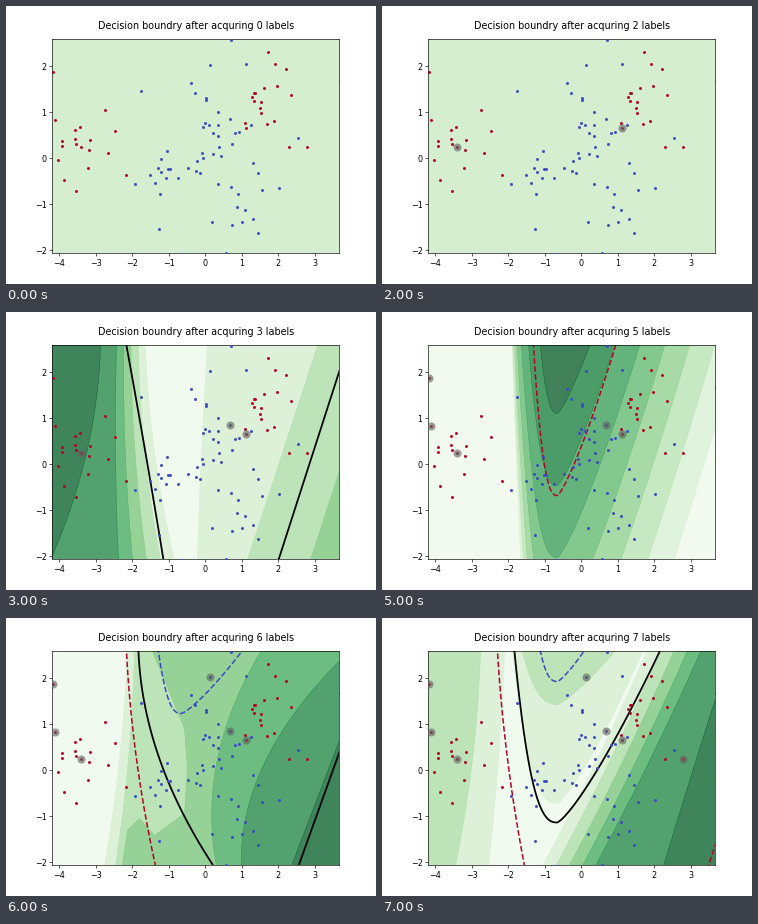
Recreate the animation shown at these times as a matplotlib script. Size 370 by 278 pixels, loop 8 s.

```python
import matplotlib.pyplot as plt
import numpy as np
from matplotlib.animation import FuncAnimation
from matplotlib.patches import Polygon

# Positions are in stage pixels, y pointing down.
W, H, DPI = 370, 278, 57.8125
LEFT, RIGHT, TOP, BOTTOM = 0.125 * W, 0.9 * W, 0.12 * H, 0.89 * H
ORIGIN, UNIT_X, UNIT_Y = (198.9, 152), 36.5, 46
ALPHA, TIP_X = 0.75, 175
BLUE, RED = plt.cm.coolwarm(0.0), plt.cm.coolwarm(1.0)

# Points in the order they receive a label.
QUERIES = [(74, 140.5), (239.3, 121.3), (223, 112.5), (46.5, 66),
           (48.3, 114), (203.3, 59), (300.5, 141)]


def cluster(rng, count, center, spread):
    return [tuple(p) for p in rng.normal(center, spread, (count, 2))]


def make_dots():
    """Key dots that shape each class, filled up with seeded clusters."""
    rng = np.random.default_rng(4)
    q = QUERIES
    red = [q[0], q[1], q[3], q[4], q[6], (119, 169), (69, 184.5),
           (108.5, 125), (333, 75), (261, 46), (279.5, 63), (282, 141)]
    red += cluster(rng, 13, (78, 135), (14, 17))
    red += cluster(rng, 14, (258, 98), (13, 19))
    blue = [q[2], q[5], (224, 33.5), (239, 58), (134.5, 85), (291, 132),
            (152.5, 222.5), (174, 247.5), (219, 247), (251.5, 227)]
    blue += cluster(rng, 22, (212, 122), (16, 24))
    blue += cluster(rng, 14, (153, 163), (17, 11))
    blue += cluster(rng, 13, (232, 185), (24, 25))
    return (red, RED), (blue, BLUE)


def sweep(top, mid, bottom):
    """Parabola through the x positions at the top, middle and bottom."""
    t = np.linspace(-0.03, 1.03, 40)
    x = (top * (1 - t) * (1 - 2 * t) + 4 * mid * t * (1 - t)
         + bottom * t * (2 * t - 1))
    return np.column_stack([x, TOP + (BOTTOM - TOP) * t])


def valley(left, tip, right):
    """Open-topped V: a steep left arm and a nearly straight right arm."""
    u = np.linspace(1.03, 0, 30)
    depth = tip - TOP
    arm_l = np.column_stack([TIP_X + (left - TIP_X) * u, tip - depth * u**2.6])
    arm_r = np.column_stack([TIP_X + (right - TIP_X) * u, tip - depth * u**1.25])
    return np.vstack([arm_l, arm_r[-2::-1]])


def fan(side, bands, first, last):
    """One region per band, with edges spread evenly from first to last."""
    edges = np.linspace(first, last, len(bands))
    return [(side, band, sweep(*e)) for band, e in zip(bands, edges)]


def region(side, band, *shape):
    edge = valley(*shape) if side == "V" else sweep(*shape)
    return side, band, edge


def nested_valleys():
    return [region("V", 7 - k, 128 + 30 * np.exp(-k / 2), 101 + 72 * k,
                   207 + 25 * k) for k in range(6, -1, -1)]


# Each state: band count, base band, regions, boundary lines.
# Side L or R fills out to that frame edge, V fills up to the top.
STATES = {
    3: (7, 0,
        fan("L", range(1, 6), (139, 148, 168), (110, 109, 112))
        + [region("L", 6, 94, 80, 44),
           region("R", 1, 201, 195, 191),
           region("R", 2, 311, 276, 241),
           region("R", 3, 374, 339, 304)],
        [("k", sweep(120, 139, 157)), ("k", sweep(341, 306.5, 272))]),
    4: (8, 0,
        fan("L", range(1, 7), (148, 156, 166), (107, 107, 112))
        + [region("L", 7, 63, 31, -2)]
        + fan("R", range(1, 4), (184, 176, 178), (250, 209, 203))
        + fan("R", range(4, 7), (293, 260, 226), (381, 347, 313)),
        [(RED, sweep(120, 122, 130)), ("k", sweep(141, 149, 162)),
         (BLUE, sweep(157, 166, 183))]),
    5: (8, 0, nested_valleys(), [(RED, valley(151, 183, 233))]),
    6: (7, 3,
        [("L", 2, np.array([(144, 28), (178, 110), (181, 150), (178, 195),
                            (148, 217), (133, 200), (121, 212), (115, 252)]))]
        + fan("L", (1, 0), (128, 122, 109), (121, 113, 98))
        + [region("R", 4, 254, 211, 210),
           region("R", 5, 342, 260, 235),
           region("R", 6, 367, 326, 285)],
        [(RED, sweep(120, 130, 149)), ("k", sweep(132, 153, 207)),
         (BLUE, valley(152, 95, 235)), ("k", sweep(369, 330.5, 292))]),
    7: (7, 0,
        fan("L", (1, 2), (122, 116, 106), (98, 90, 73))
        + [region("V", 1, 130, 185, 260), region("V", 2, 140, 86, 232)]
        + fan("R", range(1, 6), (264, 215, 160), (318, 268, 213))
        + [region("R", 6, 348, 314, 281)],
        [(RED, sweep(115, 125, 142)), ("k", valley(132, 204, 277)),
         (BLUE, valley(158, 63, 201)), (RED, sweep(394, 360, 326))]),
}


def shade(band, count, under=(1, 1, 1)):
    """Translucent band colour laid over the colour below it."""
    top = np.array(plt.cm.Greens((band + 0.5) / count)[:3])
    return ALPHA * top + (1 - ALPHA) * np.array(under)


def fill_region(side, band, edge, base, count):
    far = {"L": -20, "R": 420}.get(side)
    corners = [(far, 260), (far, 20)] if far else []
    ax.add_patch(Polygon([*edge, *corners], fc=shade(band, count), lw=0,
                         zorder=1))
    # Neighbouring bands overlap slightly and leave a darker seam.
    low = band - 1 if band > base else band
    seam = shade(low + 1, count, shade(low, count))
    ax.plot(*edge.T, color=seam, lw=0.7, zorder=1)


def paint_field(labels):
    if labels not in STATES:
        ax.set_facecolor(shade(0, 2))
        return
    count, base, regions, lines = STATES[labels]
    ax.set_facecolor(shade(base, count))
    for side, band, edge in regions:
        fill_region(side, band, edge, base, count)
    for color, path in lines:
        solid = color == "k"
        ax.plot(*path.T, color=color, lw=2.2 if solid else 1.9,
                ls="-" if solid else "--", zorder=2)


def set_axes():
    # Half a pixel puts whole-number positions on pixel centres.
    ax.set_xlim(LEFT - 0.5, RIGHT - 0.5)
    ax.set_ylim(BOTTOM - 0.5, TOP - 0.5)
    xs, ys = range(-4, 4), range(-2, 3)
    ax.set_xticks([ORIGIN[0] + UNIT_X * v for v in xs],
                  [str(v).replace("-", "\u2212") for v in xs])
    ax.set_yticks([ORIGIN[1] - UNIT_Y * v for v in ys],
                  [str(v).replace("-", "\u2212") for v in ys])


def draw(labels):
    ax.clear()
    paint_field(labels)
    for dots, color in DOTS:
        ax.scatter(*zip(*dots), s=7, color=[color], zorder=3)
    if labels:
        ax.scatter(*zip(*QUERIES[:labels]), s=100, color="0.38", alpha=0.62,
                   linewidths=0, zorder=4)
    ax.text(0.5, 1.05, f"Decision boundry after acquring {labels} labels",
            transform=ax.transAxes, ha="center", fontsize=12)
    set_axes()
    return []


DOTS = make_dots()
plt.rcParams["font.family"] = "DejaVu Sans"
fig = plt.figure(figsize=((W + 0.001) / DPI, (H + 0.001) / DPI), dpi=DPI)
ax = fig.add_axes([0.125, 0.11, 0.775, 0.77])
anim = FuncAnimation(fig, draw, frames=8, interval=1000, repeat=True)
plt.show()
```
